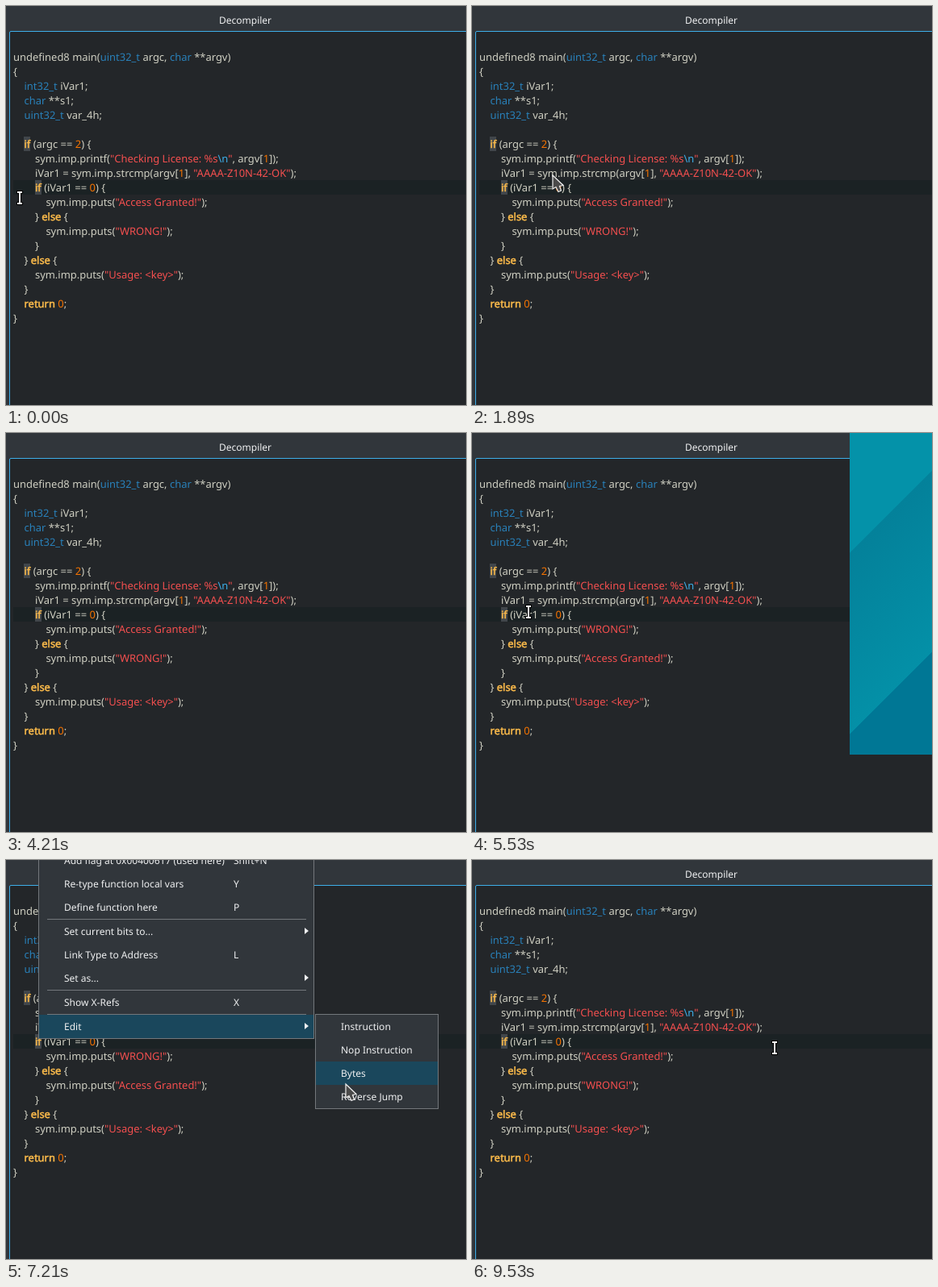
Animation, 570 px wide and 495 px high, one loop 9.68 s. Source, as an HTML page:

```html
<!DOCTYPE html>
<html lang="en">
<head>
<meta charset="utf-8">
<title>Decompiler</title>
<style>
  html, body { margin: 0; width: 100%; height: 100%; overflow: hidden; }
  body { position: relative; background: #31363b; color: #eff0f1;
    font: 12px "Noto Sans", sans-serif; text-rendering: geometricPrecision; }
  div, pre, svg { position: absolute; box-sizing: border-box; margin: 0; white-space: pre; }
  #title { left: 264px; top: 3px; line-height: 29px; }
  #editor { left: 4px; top: 31px; width: 580px; height: 480px;
    background: #232629; border: 1px solid #3daee9; border-radius: 2px; }
  #line { left: 9px; top: 216px; right: 0; height: 18px; background: #1b2224; }
  #code { left: 9px; top: 54px; color: #cfcfc2; font: 12.96px/18px "Noto Sans", sans-serif; }
  #code b { font-weight: 400; color: #fdbc4b; -webkit-text-stroke: .5px #fdbc4b; }
  #code mark { background: #41464b; }
  #code i { font-style: normal; color: #2980b9; }
  #code s { text-decoration: none; color: #f44f4f; }
  #code u { text-decoration: none; color: #f67400; }
  #code em { font-style: normal; color: #3daee9; }
  .menu { background: #31363b; border: 1px solid #73777b; }
  #menu { width: 342px; height: 237px; }
  #sub { left: 342px; top: 205px; width: 153px; height: 118px; }
  .item { position: relative; height: 29px; line-height: 29px; padding-left: 31px; }
  .item.on { background: #1a475c; }
  .key { left: 241px; top: 0; }
  .more { left: 329px; top: 10px; border: 4px solid transparent; border-left: 5px solid #eff0f1; border-right: 0; }
  .sep { position: relative; margin: 0 9px 0 10px; height: 1px; background: #73777b; }
  #wide { left: 468px; top: 0; width: 102px; height: 399px;
    background: linear-gradient(135deg, #0492a9 105px, #04819a 105.5px, #0490a7 264px, #007795 264.5px); }
  #small { left: 474px; top: 63px; width: 96px; height: 51px;
    background: linear-gradient(135deg, #0492a9 56px, #007a98 56.5px); }
  svg { left: 0; top: 0; width: 100%; height: 100%; fill: none; }
</style>
</head>
<body>
<div id="title">Decompiler</div>
<div id="editor"></div>
<div id="line"></div>
<pre id="code">undefined8 main(<i>uint32_t</i> argc, <i>char</i> **argv)
{
    <i>int32_t</i> iVar1;
    <i>char</i> **s1;
    <i>uint32_t</i> var_4h;

    <mark><b>if</b></mark> (argc == <u>2</u>) {
        sym.imp.printf(<s>"Checking License: %s<em>\n</em>"</s>, argv[<u>1</u>]);
        iVar1 = sym.imp.strcmp(argv[<u>1</u>], <s>"AAAA-Z10N-42-OK"</s>);
        <mark><b>if</b></mark> (iVar1 == <u>0</u>) {
            sym.imp.puts(<s id="yes"></s>);
        } <b>else</b> {
            sym.imp.puts(<s id="no"></s>);
        }
    } <b>else</b> {
        sym.imp.puts(<s>"Usage: &lt;key&gt;"</s>);
    }
    <b>return</b> <u>0</u>;
}</pre>
<div id="menu" class="menu"></div>
<div id="wide"></div>
<div id="small"></div>
<svg>
  <path id="arrow" d="M0 0V17L4 14.5L7 20.5L10.5 19L8.5 13.5L13 12.5Z" fill="#4a4a4a" stroke="#eee" stroke-width="1.2"/>
  <g id="beam">
    <path d="M-4 -7H4M-4 7H4M0 -7V7" stroke="#000" stroke-width="4"/>
    <path d="M-3 -7H3M-3 7H3M0 -7V7" stroke="#fff" stroke-width="2"/>
  </g>
</svg>
<script>
const LOOP = 9680, ITEM = 29;
const $ = id => document.getElementById(id);
const show = (id, on) => $(id).style.display = on ? '' : 'none';

function add(parent, cls, text = '') {
  const el = document.createElement('div');
  el.className = cls;
  el.textContent = text;
  parent.append(el);
  return el;
}

// '-' is a separator, '>' marks an item with a submenu
const entries = [
  ['Add flag at 0x00400617 (used here)', 'Shift+N'], ['Re-type function local vars', 'Y'],
  ['Define function here', 'P'], '-', ['Set current bits to...', '>'], ['Link Type to Address', 'L'],
  ['Set as...', '>'], '-', ['Show X-Refs', 'X'], '-', ['Edit', '>']
];
let edit;
for (const e of entries) {
  if (e === '-') { add($('menu'), 'sep'); continue; }
  const [label, key] = e;
  edit = add($('menu'), 'item', label);
  if (key === '>') add(edit, 'more');
  else add(edit, 'key', key);
}
add($('menu'), 'menu').id = 'sub';
const subItems = ['Instruction', 'Nop Instruction', 'Bytes', 'Reverse Jump'].map(s => add($('sub'), 'item', s));

// Pointer moves: begin, end, x, y; it rests in between
const moves = [
  [110, 160, 20, 248], [420, 740, 45, 217], [890, 1050, 41, 225], [1470, 1850, 100, 210],
  [2110, 2950, 437, 300], [3840, 4250, 585, 320], [4840, 5530, 70, 222], [5540, 6000, 40, 223],
  [6210, 6680, 90, 206], [6950, 7210, 421, 278], [7680, 7950, 585, 433], [7960, 8370, 92, 224],
  [8530, 9470, 480, 510], [9529, 9530, 375, 233]
];
// Sideways speed comes first, vertical speed last
function pointer(t) {
  let x = 17, y = 238;
  for (const [begin, end, toX, toY] of moves) {
    const k = Math.min(1, Math.max(0, (t - begin) / (end - begin)));
    x += (toX - x) * k * (2 - k);
    y += (toY - y) * k * k;
  }
  return [x, y];
}

function draw(t) {
  const within = (a, b) => t >= a && t < b;
  const [x, y] = pointer(t);
  const second = t > 5000;
  const mx = second ? 40 : 41, my = second ? -15 : -13;
  const subOpen = within(2110, 3840) || within(6950, 7680);

  const texts = ['"Access Granted!"', '"WRONG!"'];
  if (within(4500, 8050)) texts.reverse();
  [$('yes').textContent, $('no').textContent] = texts;

  show('menu', within(1210, 1890) || within(1950, 3840) || within(6160, 7680));
  show('sub', subOpen);
  $('menu').style.left = mx + 'px';
  $('menu').style.top = my + 'px';
  edit.classList.toggle('on', subOpen || y < my + 236);
  const hover = x >= mx + 343 ? Math.floor((y - my - 207) / ITEM) : -1;
  subItems.forEach((el, i) => el.classList.toggle('on', i === hover));

  show('wide', within(5530, 5580));
  show('small', within(8370, 8530));

  const arrow = within(1210, 4500) || within(6160, 7960);
  show('arrow', arrow);
  show('beam', !arrow);
  $(arrow ? 'arrow' : 'beam').setAttribute('transform', `translate(${Math.round(x)} ${Math.round(y)})`);
}

const start = performance.now();
function tick() {
  draw((performance.now() - start) % LOOP);
  requestAnimationFrame(tick);
}
tick();
</script>
</body>
</html>
```
